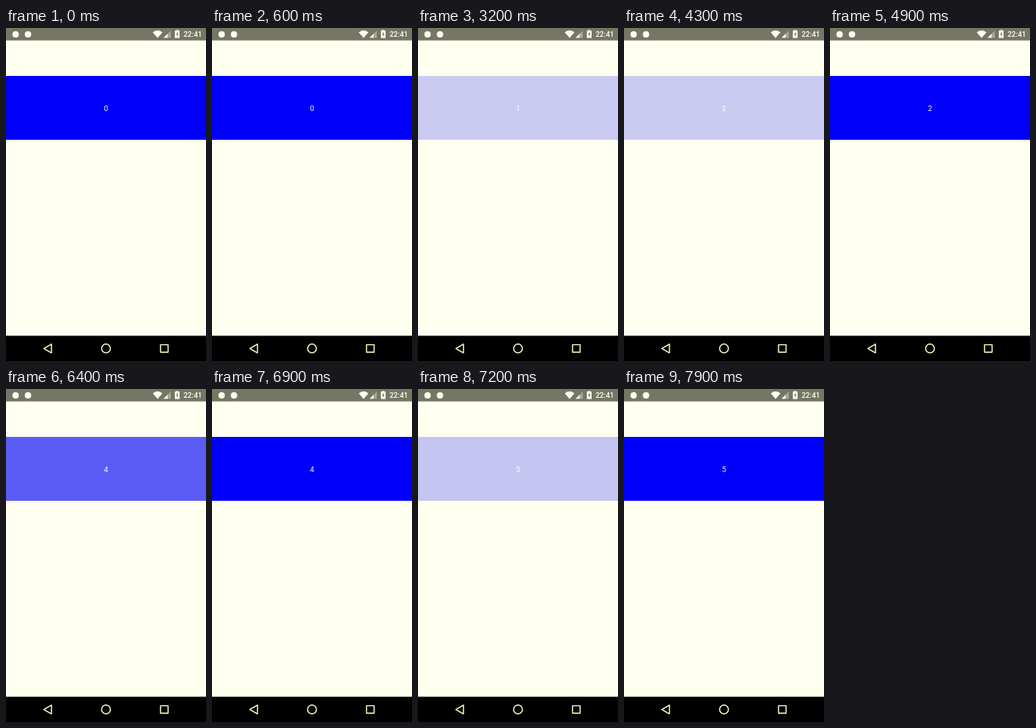
Write an HTML page that moves like this. It is 250 px wide and 417 px high and loops after 8 s.

```html
<!DOCTYPE html>
<html lang="en">
<head>
<meta charset="utf-8">
<title>Tap counter</title>
<style>
  html, body { margin: 0; width: 100%; height: 100%; overflow: hidden; background: #fffff0; }
  svg { display: block; width: 100%; height: 100%; }
  text { font-family: Roboto, sans-serif; font-size: 9.1px; }
  #status text { font-weight: 500; }
</style>
</head>
<body>
<svg viewBox="0 0 250 417" preserveAspectRatio="none">
  <rect width="250" height="417" fill="#fffff0"/>

  <g id="status" fill="#fffff0">
    <rect width="250" height="15.600" fill="#767664"/>
    <circle cx="12" cy="8" r="4"/>
    <circle cx="27.500" cy="8" r="4"/>
    <path d="M183.500 5.400Q189.500 0.800 195.500 5.400L189.500 12.400Z"/>
    <path d="M206 3.200V12.200H197Z" fill="#a9a996"/>
    <path d="M202 7.200V12.200H197Z"/>
    <path d="M212.700 3.200V2.500H215.300V3.200H217V12.400H211V3.200Z"/>
    <path d="M214.600 4.600L212.600 8.300H213.800V11L215.600 7.300H214.600Z" fill="#767664"/>
    <text x="221.900" y="11.400">22:41</text>
  </g>

  <g id="button">
    <rect y="60" width="250" height="80" fill="#0000fa"/>
    <text id="count" x="125" y="103.600" text-anchor="middle" fill="#fffff0">0</text>
  </g>

  <rect y="385.400" width="250" height="31.600"/>
  <g fill="none" stroke="#ffffc0" stroke-width="1.400" stroke-linejoin="round">
    <path d="M47.300 401.300L56.800 395.800V406.800Z"/>
    <circle cx="125" cy="401.300" r="5.500"/>
    <rect x="193.200" y="396.600" width="9.400" height="9.400"/>
  </g>
</svg>
<script>
  const LOOP = 8000, FADE = 250, DIM = 0.2;
  // Each tap: [time, how long the button stays dim]
  const taps = [[3200, 70], [4300, 70], [5300, 120], [6200, 70], [7100, 70]];
  const button = document.getElementById('button');
  const count = document.getElementById('count');

  const easeInOut = p => p < 0.5 ? 2 * p * p : 1 - 2 * (1 - p) ** 2;

  function opacityAfter(elapsed, hold) {
    const p = Math.min(1, Math.max(0, (elapsed - hold) / FADE));
    return DIM + (1 - DIM) * easeInOut(p);
  }

  function draw(now) {
    const t = now % LOOP;
    const done = taps.filter(([at]) => at <= t);
    const last = done[done.length - 1];
    button.setAttribute('opacity', last ? opacityAfter(t - last[0], last[1]) : 1);
    count.textContent = done.length;
    requestAnimationFrame(draw);
  }
  draw(performance.now());
</script>
</body>
</html>
```
